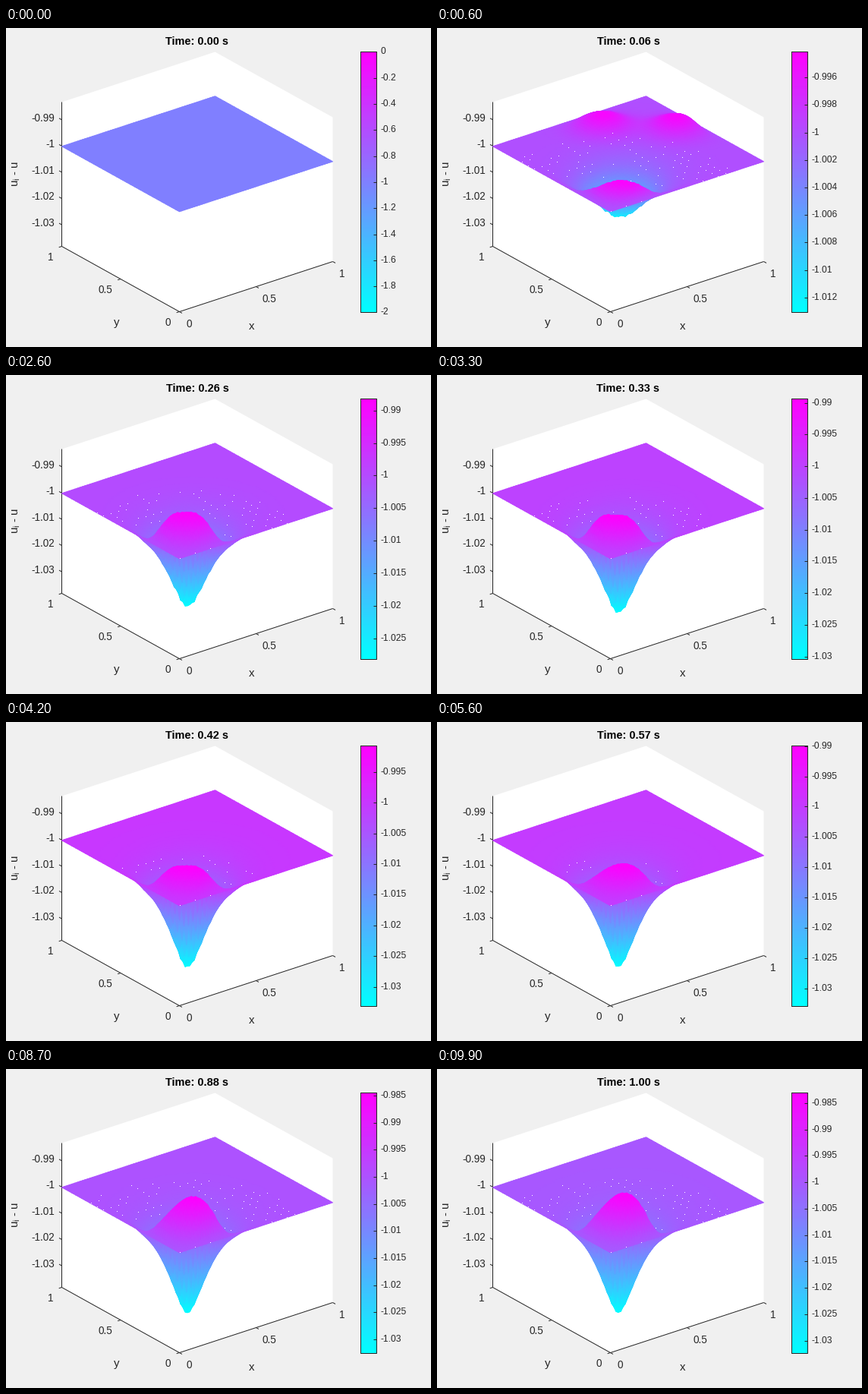
Recreate the animation shown at these times as a matplotlib script. Size 560 by 420 pixels, loop 10 s.

```python
import matplotlib.pyplot as plt
import numpy as np
from matplotlib.animation import FuncAnimation
from matplotlib.collections import LineCollection

W, H, FRAMES = 560, 420, 100
DARK = "#262626"
PX = 0.72                # points per pixel at 100 dpi
Z_PX = 3455              # pixels per unit of z
BAR_L, BAR_R, BAR_T, BAR_B = 466.5, 487, 31, 374

plt.rcParams["font.family"] = "Liberation Sans"
plt.rcParams["axes.unicode_minus"] = False

fig = plt.figure(figsize=(W / 100, H / 100), dpi=100, facecolor="#f0f0f0")
ax = fig.add_axes([0, 0, 1, 1])
ax.axis("off")


def project(x, y, dz=0):
    """Screen position of a point; dz is the height above z = -1."""
    return 228 + 202 * x - 155 * y, 241.3 - 66 * x - 86 * y - Z_PX * dz


def label(x, y, s, size=13.5, ha="center", color=DARK, **kw):
    return ax.text(x, y, s, fontsize=size * PX, ha=ha, va="center", color=color, **kw)


def line(xs, ys):
    ax.plot(xs, ys, color=DARK, lw=PX, solid_capstyle="butt", zorder=2)


def draw_axes():
    ax.fill([73, 275, 430, 430, 228, 73], [97, 31, 117, 307, 373, 287],
            color="white", lw=0, zorder=1)
    line([73, 73, 228, 430], [97, 287, 373, 307])
    for f in (0, 0.5, 1):
        x, y = 228 + 202 * f, 373 - 66 * f
        line([x, x + 3.5], [y, y + 1.9])
        label(x + 8.5, y + 17, f"{f:g}", ha="left")
        x, y = 228 - 155 * f, 373 - 86 * f
        line([x, x - 3.8], [y, y + 1.2])
        label(x - 11, y + 15, f"{f:g}", ha="right")
    for i in range(5):
        y = 120.3 + 34.55 * i
        line([73, 69.5], [y, y - 1.9])
        label(64, y - 2, f"{-0.99 - 0.01 * i:g}", ha="right")
    label(323, 393, "x", 15)
    label(145, 388, "y", 15)
    label(13.5, 192, r"$\mathregular{u_i}$ - u", 15, rotation=90)


draw_axes()
ax.imshow(np.linspace(1, 0, 256)[:, None], cmap="cool", aspect="auto",
          extent=(BAR_L, BAR_R, BAR_B, BAR_T), zorder=2)
ax.plot([BAR_L, BAR_R, BAR_R, BAR_L, BAR_L], [BAR_T, BAR_T, BAR_B, BAR_B, BAR_T],
        color=DARK, lw=PX, zorder=4)
title = label(251.5, 17.5, "", 14.5, weight="bold", color="black")
bar_ticks = ax.add_collection(LineCollection([], colors=DARK, linewidths=PX, zorder=4))
bar_labels = [label(492.5, 0, "", 12, ha="left") for _ in range(13)]
specks, = ax.plot([], [], ",", color="white", zorder=5)
ax.set_xlim(-0.5, W - 0.5)
ax.set_ylim(H - 0.5, -0.5)

# Grid runs from the far corner to the near one so nearer cells paint last.
N = 61
axis = np.linspace(1, 0, N)
X, Y = np.meshgrid(axis, axis, indexing="ij")
M, T = (X + Y) / 2, X - Y
rng = np.random.default_rng(4)
NOISE = rng.normal(size=(N, N))
DOTS = np.zeros((N, N), bool)
DOTS[::3, ::3] = True
DOTS &= (rng.random((N, N)) < 0.5) & ((M > 0.28) | ((Y == 0) & (X < 0.25)))


def edge(v):
    return 1 - np.exp(-(v / 0.03) ** 2)


def blob(cx, cy, s, power=2):
    return np.exp(-(np.hypot(X - cx, Y - cy) / s) ** power)


WINDOW = edge(X) * edge(Y) * edge(1 - X) * edge(1 - Y)
HALO = blob(0.38, 0.38, 0.26)
RIPPLES = blob(0.87, 0.58, 0.14) + blob(0.59, 0.83, 0.14)


def depth(t):
    return np.interp(t, [0, 0.12, 0.26, 0.42, 1], [0, 0.0259, 0.0281, 0.0332, 0.0324])


def height(t):
    return np.interp(t, [0, 0.12, 0.26, 0.42, 0.7, 0.88, 1],
                     [0, 0.0116, 0.0118, 0.0092, 0.0108, 0.0155, 0.0169])


def surface(t):
    """Height above z = -1: a dent behind a bump, scaled to depth and height."""
    if t == 0:
        return np.zeros((N, N))
    early = np.exp(-t / 0.15)
    flat = np.exp(-((t - 0.34) / 0.15) ** 2)
    mid = 0.215 + 0.04 * early
    dent = blob(mid, mid, 0.135 + 0.04 * early, 1.5 + 0.6 * early)
    dent *= 1 + 0.04 * NOISE * np.exp(-t / 0.3)
    u = (M - 0.15) / np.where(M < 0.15, 0.05, 0.03)
    v = np.abs(T - 0.035 * (1 - flat)) / 0.165
    bump = np.exp(-0.5 * u ** 2 - 0.5 * v ** (2 + 0.8 * flat))
    raw = WINDOW * (1.15 * bump - dent - (0.05 + 0.2 * early) * HALO)
    dz = np.where(raw > 0, raw * height(t) / raw.max(), -raw * depth(t) / raw.min())
    return dz + 0.0055 * WINDOW * RIPPLES * np.exp(-(t / 0.16) ** 4) * min(1, t / 0.05)


def visible_dots(sx, sy, t):
    reach = 0.62 - 0.28 * np.exp(-((t - 0.52) / 0.2) ** 2)
    keep = DOTS & (np.hypot(X - 0.2, Y - 0.2) < reach)
    px, py, pm = sx[keep], sy[keep], M[keep]
    hidden = ((np.abs(sx.ravel() - px[:, None]) < 4)
              & (M.ravel() < pm[:, None] - 0.05)
              & (sy.ravel() < py[:, None])).any(axis=1)
    return px[~hidden], py[~hidden]


def update_bar(lo, hi):
    span = hi - lo
    base = 10.0 ** np.floor(np.log10(span / 10))
    step = next(m * base for m in (1, 2, 5, 10, 20) if span / (m * base) <= 10.5)
    ticks = np.arange(np.ceil(lo / step - 1e-6), np.floor(hi / step + 1e-6) + 1) * step
    ys = BAR_B - (ticks - lo) / span * (BAR_B - BAR_T)
    bar_ticks.set_segments([[(BAR_R - 4, y), (BAR_R, y)] for y in ys])
    for txt in bar_labels:
        txt.set_text("")
    for txt, v, y in zip(bar_labels, ticks, ys):
        txt.set_text(f"{round(v, 6) + 0.0:g}")
        txt.set_y(y)


mesh = None


def update(k):
    global mesh
    t = k / (FRAMES - 1)
    dz = surface(t)
    lo, hi = (dz.min() - 1, dz.max() - 1) if k else (-2, 0)
    sx, sy = project(X, Y, dz)
    if mesh is not None:
        mesh.remove()
    mesh = ax.pcolormesh(sx, sy, dz - 1, shading="gouraud", cmap="cool",
                         vmin=lo, vmax=hi, zorder=3)
    specks.set_data(*(visible_dots(sx, sy, t) if k else ([], [])))
    update_bar(lo, hi)
    title.set_text(f"Time: {t:.2f} s")
    return []


anim = FuncAnimation(fig, update, frames=FRAMES, interval=100,
                     init_func=lambda: [], repeat=True, repeat_delay=0)
plt.show()
```
